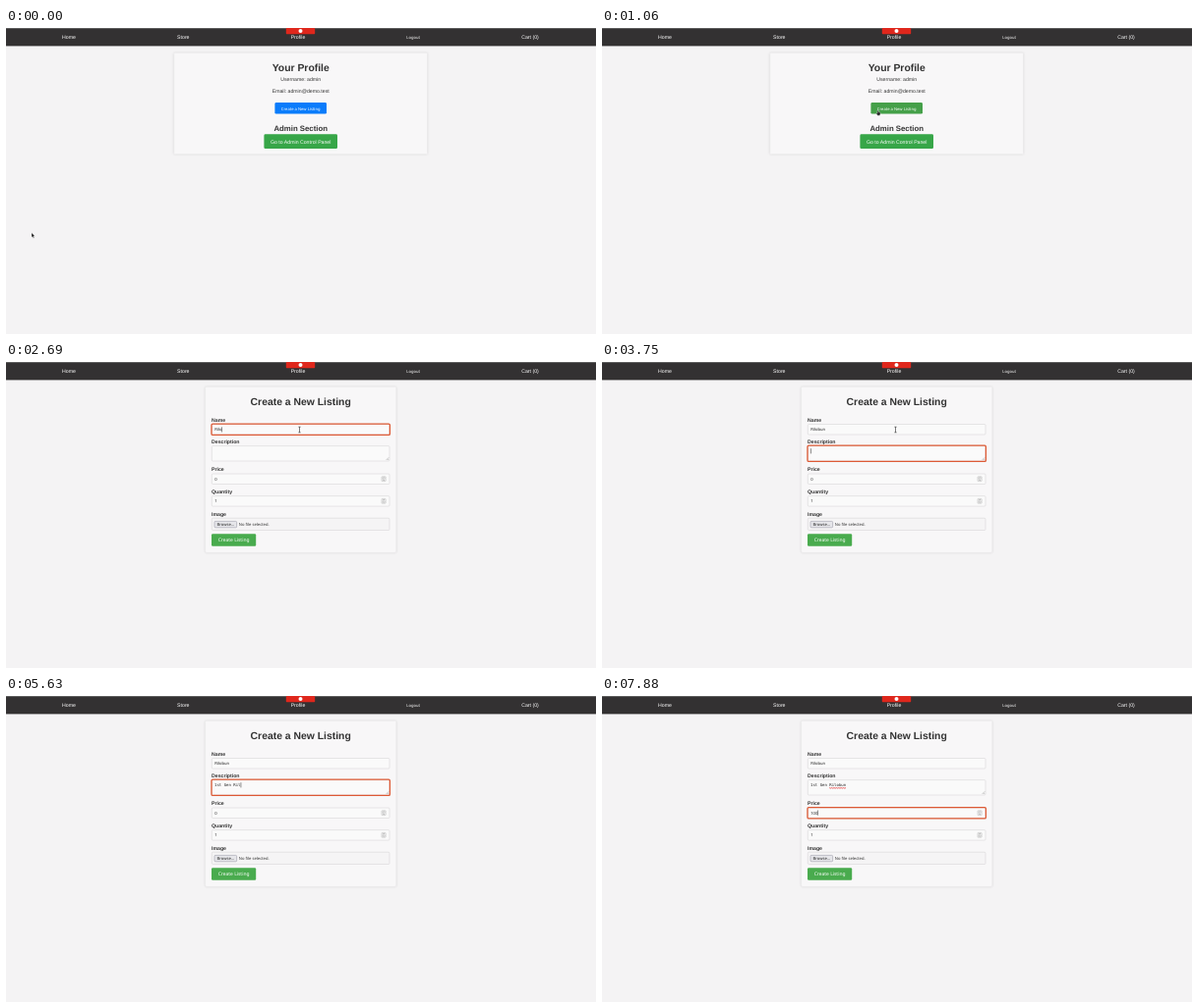
Write an HTML page that moves like this. It is 600x312 px and loops after 8000 ms.

```html
<!DOCTYPE html>
<html lang="en">
<head>
<meta charset="utf-8">
<title>Create a listing</title>
<style>
  html, body { margin: 0; width: 100%; height: 100%; overflow: hidden; background: #f4f3f4; }
  svg { display: block; width: 600px; height: 312px; }
  text {
    font: 5.2px "Liberation Sans", Arial, sans-serif;
    fill: #333;
    text-rendering: geometricPrecision;
    white-space: pre;
  }
  .mid { text-anchor: middle; }
  .light text, text.light { fill: #fff; }
  .h1 { font-size: 10.4px; font-weight: bold; }
  .h2 { font-size: 7.8px; font-weight: bold; }
  .label { font-weight: bold; }
  .ui { font-family: "Noto Sans", "Open Sans", sans-serif; font-size: 4.13px; }
  .wide { font-size: 4.95px; }
  .mono { font-family: "DejaVu Sans Mono", monospace; font-size: 4px; }
  .value { fill: #222; }
  .card { fill: #f8f7f8; stroke: #e9e8e9; stroke-width: .6; filter: drop-shadow(0 0 1.2px rgba(0, 0, 0, .1)); }
  .field { fill: #fafafa; stroke: #d0cfd0; stroke-width: .5; }
  .ring { fill: none; stroke: #dd5a35; stroke-width: 1.3; }
</style>
</head>
<body>
<svg viewBox="0 0 600 312">
  <rect width="600" height="312" fill="#f4f3f4"/>

  <g class="light">
    <rect width="600" height="18.4" fill="#333132"/>
    <rect width="600" height=".6" fill="#777"/>
    <text class="mid" x="64" y="11.4">Home</text>
    <text class="mid" x="180.3" y="11.4">Store</text>
    <text class="mid" x="297" y="11.4">Profile</text>
    <text class="mid ui" x="414.2" y="11">Logout</text>
    <text class="mid" x="533" y="11.4">Cart (0)</text>
    <rect x="284.8" y="0" width="29.4" height="6.2" rx=".8" fill="#df271c"/>
    <circle cx="299.5" cy="3" r="2" fill="#fff"/>
  </g>

  <g id="profile">
    <rect class="card" x="170.7" y="25.3" width="257.8" height="103.4" rx="1"/>
    <text class="mid h1" x="299.7" y="44">Your Profile</text>
    <text class="mid" x="299.7" y="54.4">Username: admin</text>
    <text class="mid" x="299.7" y="65.9">Email: admin@demo.test</text>
    <rect id="newBtn" x="273.4" y="76" width="52.6" height="11.6" rx="1.4"/>
    <text class="mid ui light" x="299.7" y="83.5">Create a New Listing</text>
    <text class="mid h2" x="299.7" y="104.9">Admin Section</text>
    <rect x="262.4" y="108.3" width="74.6" height="14.8" rx="1.4" fill="#37a648"/>
    <text class="mid light" x="299.7" y="117.6">Go to Admin Control Panel</text>
  </g>

  <g id="form">
    <rect class="card" x="202.6" y="25.3" width="194.2" height="169" rx="1.2"/>
    <text class="mid h1" x="299.7" y="44">Create a New Listing</text>
    <g id="fields"></g>

    <path d="M386.6 100 l2.6 -2.6 M388.2 100 l1 -1" stroke="#777" stroke-width=".4"/>
    <rect x="212" y="162.4" width="22.6" height="6.4" rx=".9" fill="#e6e6ea" stroke="#8f8f9d" stroke-width=".5"/>
    <text class="mid ui value" x="223.3" y="167">Browse...</text>
    <text class="ui" x="236.8" y="167">No file selected.</text>
    <rect x="209" y="175.2" width="45.2" height="12.6" rx="1.2" fill="#49ab4e"/>
    <text class="mid ui wide light" x="231.6" y="183.3">Create Listing</text>

    <rect id="select" x="211.9" y="116.4" width="2.6" height="5.6" fill="#e95420"/>
    <text class="ui value" id="name" x="212.2" y="70.4"></text>
    <text class="mono value" id="desc" x="212" y="92.3"></text>
    <text class="ui value" id="price" x="212.2" y="120.6"></text>
    <text class="ui value" x="212.2" y="143.2">1</text>
    <path id="squiggle" fill="none" stroke="#e02020" stroke-width=".7"/>
    <rect class="ring" id="ring" x="209" width="181.4" rx="1.2"/>
    <rect id="caret" width=".5" height="5.2" fill="#222"/>
  </g>

  <path id="arrow" d="M0 0 V4.8 L1.1 3.8 L1.9 5.5 L2.7 5.1 L1.9 3.5 H3.4 Z" fill="#111" stroke="#fff" stroke-width=".35"/>
  <path id="hand" d="M-.5 -2 h.9 v1.5 l2 .5 v2 l-.7 1.2 h-2 l-1.3 -2 l.4 -.7 l.7 .5 Z" fill="#222" stroke="#fff" stroke-width=".3"/>
  <path id="beam" d="M-1.1 -2.8 H1.1 M0 -2.8 V2.8 M-1.1 2.8 H1.1" fill="none" stroke="#222" stroke-width=".6"/>
</svg>

<script>
const LOOP = 8000;
const $ = id => document.getElementById(id);
const show = (id, on) => { $(id).style.display = on ? '' : 'none'; };
const within = (t, from, to) => t >= from && t < to;

// label, label centre, box top, box height
const rows = [
  ['Name', 59, 63.5, 10.5],
  ['Description', 81.5, 85.6, 15.4],
  ['Price', 109.5, 114, 10.5],
  ['Quantity', 132, 136.6, 10.5],
  ['Image', 154.6, 159.2, 12.3]
];

function buildFields() {
  const spinner = y => `
    <rect x="382" y="${y - 2.4}" width="4.2" height="4.8" rx=".6" fill="#eee" stroke="#aaa" stroke-width=".4"/>
    <path d="M383.2 ${y - .6} l.9 -.9 l.9 .9 M383.2 ${y + .6} l.9 .9 l.9 -.9" fill="none" stroke="#555" stroke-width=".4"/>`;
  $('fields').innerHTML = rows.map(([label, mid, top, h]) => `
    <text class="label" x="209" y="${mid + 1.9}">${label}</text>
    <rect class="field" x="209.3" y="${top}" width="180.7" height="${h}" rx="1"
      ${label === 'Image' ? 'style="fill:#f5f4f5"' : ''}/>
    ${label === 'Price' || label === 'Quantity' ? spinner(top + 5.2) : ''}`).join('');

  let d = 'M231.2 93.6';
  for (let i = 0; i < 14; i++) d += ` l1.2 ${i % 2 ? -.5 : .5}`;
  $('squiggle').setAttribute('d', d);
}

// Key times for each typed character
const nameKeys = [2250, 2380, 2560, 2690, 2750, 2810, 2880];
const descKeys = [4440, 4630, 4740, 4850, 4960, 5060, 5170, 5270, 5380, 5500, 5630, 5690, 5810, 5940, 6060];
const priceKeys = [6560, 6690, 6810];
const focusTimes = [2060, 3750, 6190];
const caretGaps = [[3190, 3500], [4060, 4310], [7190, 7560]];

const typed = (text, keys, t) => text.slice(0, keys.filter(k => k <= t).length);

function glide(t, start, end, steps, from, to) {
  const raw = Math.min(1, Math.max(0, (t - start) / (end - start)));
  const u = t < start ? 0 : Math.min(1, (Math.floor(raw * (steps - 1)) + 1) / steps);
  const e = u * u * (3 - 2 * u);
  return from.map((v, i) => v + (to[i] - v) * e);
}

function drawPointer(t, onForm) {
  const [x, y] = onForm
    ? glide(t, 1380, 2130, 13, [281, 87], [298.5, 69])
    : glide(t, 250, 940, 12, [26, 208.8], [280.6, 86]);
  const overButton = !onForm && x > 273.4 && y < 87.6;
  const overField = onForm && (y > 85.6 || y < 74);
  const kind = overButton ? 'hand' : overField ? 'beam' : 'arrow';
  for (const id of ['arrow', 'hand', 'beam']) {
    show(id, id === kind && t < 4060);
    $(id).setAttribute('transform', `translate(${x} ${y})`);
  }
  $('newBtn').setAttribute('fill', overButton ? '#45a049' : '#0a7cfb');
}

function drawForm(t) {
  const focus = focusTimes.filter(f => f <= t).length - 1;
  const selecting = within(t, focusTimes[2], priceKeys[0]);
  $('name').textContent = typed('Rilobun', nameKeys, t);
  $('desc').textContent = typed('1st Gen Rilobun', descKeys, t);
  $('price').textContent = typed('100', priceKeys, t) || '0';
  $('price').style.fill = selecting ? '#fff' : '';
  show('select', selecting);
  show('squiggle', t >= focusTimes[2]);

  show('ring', focus >= 0);
  const blinkOff = caretGaps.some(([a, b]) => within(t, a, b));
  show('caret', focus >= 0 && !selecting && !blinkOff);
  if (focus < 0) return;

  const [, , top, h] = rows[focus];
  $('ring').setAttribute('y', top - .4);
  $('ring').setAttribute('height', h + .8);
  const input = $(['name', 'desc', 'price'][focus]);
  const width = input.textContent ? input.getComputedTextLength() : 0;
  $('caret').setAttribute('x', 212.2 + width);
  $('caret').setAttribute('y', +input.getAttribute('y') - 4.1);
}

function frame() {
  const t = performance.now() % LOOP;
  const onForm = t >= 1190;
  show('profile', !onForm);
  show('form', onForm);
  drawPointer(t, onForm);
  if (onForm) drawForm(t);
  requestAnimationFrame(frame);
}

buildFields();
frame();
</script>
</body>
</html>
```
